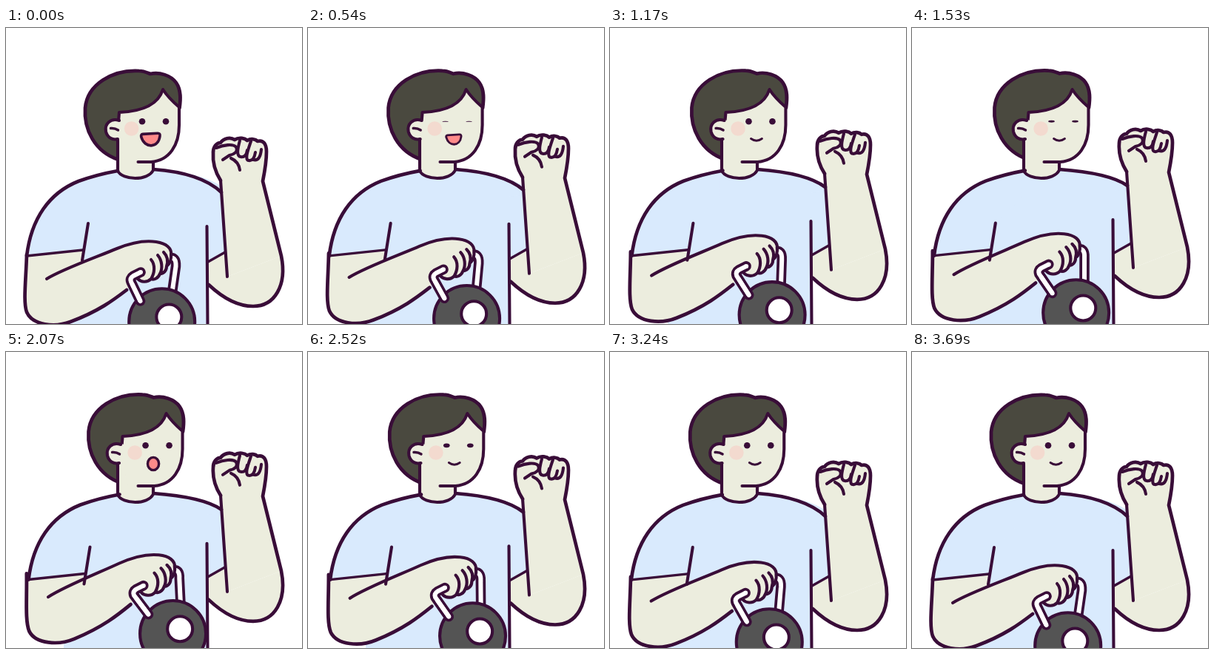
Write an HTML page that moves like this. It is 400x400 px and loops after 4.05 s.

```html
<!DOCTYPE html>
<html lang="en">
<head>
<meta charset="utf-8">
<title>Kettlebell workout</title>
<style>
  html, body { margin: 0; width: 100%; height: 100%; overflow: hidden; background: #fff; }
  svg { display: block; width: 100vw; height: 100vh; }
  .line { fill: none; }
  .edge { fill: none; stroke-width: 4.7; }
  .skin { fill: #ecedde; }
  .shirt { fill: #d9eafd; }
  .hair { fill: #4a493f; stroke-width: 4.7; }
  .flat { stroke: none; }
  .thin { stroke-width: 3.4; }
  .rim { fill: none; stroke-width: 13.5; }
  .core { fill: none; stroke: #fff; stroke-width: 6; }
</style>
</head>
<body>
<svg viewBox="0 0 400 400" stroke="#390d38" stroke-width="4.1" stroke-linecap="round" stroke-linejoin="round">
  <!-- torso -->
  <path class="shirt flat" d="M90 300C90 250 100 225 130 205L151 193L199 191C240 193 272 201 291 214L293 250L272 262V400H78V380Z"/>

  <!-- raised arm -->
  <g id="raised">
    <path class="skin flat" d="M273 316L297 303L299 336L372 308C380 348 363 376 334 376C312 376 291 363 274 347"/>
    <path class="shirt flat" d="M272 232L291 230L297 303L272 316Z"/>
    <path class="line thin" d="M273 316L296 303"/>
    <path class="skin flat" d="M299 336L290 206C283 195 279 181 280 168C280 160 285 155 290 155C294 149 303 147 309 151C315 147 323 149 326 152C331 149 337 150 340 153C348 151 352 157 352 167C352 180 350 192 347 207L372 308Z"/>
    <path class="edge" d="M290 206C283 195 279 181 280 168C280 160 285 155 290 155C294 149 303 147 309 151C315 147 323 149 326 152C331 149 337 150 340 153C348 151 352 157 352 167C352 180 350 192 347 207L372 308C380 348 363 376 334 376C312 376 291 363 274 347"/>
    <path class="line" d="M290 206L299 336M284 162C294 158 307 156 311 161C314 167 308 171 302 172L293 178M304 176C311 179 315 185 316 192"/>
    <path class="line" d="M316 152C313 163 311 173 317 174C322 175 325 172 326 165M331 153C327 165 322 178 328 179C334 180 336 174 337 168M345 164C344 174 341 180 334 178"/>
  </g>
  <path id="shoulder" class="edge"/>
  <path id="side" class="line"/>

  <!-- neck and head -->
  <path id="backHair" class="hair" d="M152 178C119 167 105 136 107 108C110 76 144 56 180 58C186 58 190 60 195 62C207 59 223 64 230 74C237 84 236 97 234.5 108L200 140Z"/>
  <path class="skin flat" d="M151 140V193C157 206 192 207 199 192V160Z"/>
  <path class="line" d="M151 148V193C157 206 192 207 199 192V181"/>
  <g id="face">
    <path class="skin flat" d="M153 114C178 113 205 106 212 83C219 94 227 101 234 107V131C234 158 221 179 196 181H160L153 150Z"/>
    <path class="line" d="M152 126L153 114C178 113 205 106 212 83C219 94 227 101 234 107V131C234 158 221 179 196 181H184"/>
    <circle class="flat" cx="169.6" cy="136" r="9.8" fill="#f3dacf"/>
    <g fill="#390d38" stroke="none">
      <ellipse class="eye" cx="184" cy="126.3" rx="4.3"/>
      <ellipse class="eye" cx="216" cy="126.3" rx="4.3"/>
    </g>
    <path id="smile" class="line" stroke-width="2.8" d="M187 149.5Q194.5 155 202 149.5"/>
    <path id="laugh" fill="#ff8a8a" stroke-width="3.6" d="M185 143.4L205 142.2Q208.5 142 208 146C206 163 187 163 182.7 147Q182 143.7 185 143.4Z"/>
    <ellipse id="gasp" fill="#ff8a8a" stroke-width="3.4" cx="194.5" cy="151" rx="7.6" ry="8.6"/>
  </g>
  <path class="line" d="M178.5 181H196"/>
  <g id="ear">
    <path class="skin flat" d="M158 125C141 121 133 130 135 140C137 148 144 152 158 150Z"/>
    <path class="line" d="M153 125C141 121 133 130 135 140C137 148 144 152 151 150"/>
    <path class="line thin" d="M141.5 135.5Q147 135 151.5 138"/>
  </g>

  <!-- kettlebell behind the hand -->
  <path class="rightTube rim"/>
  <path class="rightTube core"/>
  <g id="bell">
    <circle cx="210.7" cy="396.8" r="44.5" fill="#545454"/>
    <circle cx="220.3" cy="390.5" r="17" fill="#fff"/>
  </g>

  <!-- lifting arm -->
  <g id="lift">
    <path class="skin flat" d="M28 304L104 297L102 317L150 298C172 289 190 287 203 289C217 291 224 298 223 306C224 314 221 319 217 322C217 328 213 332 208 332C206 338 200 341 196 339C190 345 182 343 176 338L163 354C146 367 125 383 87 397C66 405 36 402 28 384C23 370 27 340 28 304Z"/>
    <path class="line" d="M55 339C76 326 124 309 150 298C172 289 190 287 203 289C217 291 224 298 223 306"/>
    <path class="edge" d="M163 354C146 367 125 383 87 397C66 405 36 402 28 384C23 370 27 340 28 306"/>
  </g>
  <g id="fingers">
    <path class="skin flat" d="M180 329L196 312L214 300L223 304C224 314 221 319 217 322C217 328 213 332 208 332C206 338 200 341 196 339C190 345 181 342 178 335Z"/>
    <path class="line" d="M223 304C224 314 221 319 217 322C217 328 213 332 208 332C206 338 200 341 196 339C190 345 182 343 178 339M213 303C219 309 219 316 217 322M205 307C211 314 212 325 208 332M196 313C202 320 201 331 196 339"/>
  </g>
  <path class="leftTube rim"/>
  <path class="leftTube core" stroke-linecap="butt"/>
  <path class="leftTube core" pathLength="100" stroke-dasharray="0 50 50"/>

  <!-- left sleeve -->
  <g id="sleeve">
    <path class="shirt flat" d="M28 308C34 258 58 223 98 207Q123 198 147 194V230L111 264L104 300Z"/>
    <path class="edge" d="M151 193Q123 198 98 207C58 223 34 258 28 308"/>
    <path class="line thin" d="M28 308L104 300"/>
    <path class="line" d="M111 264L103 314"/>
  </g>
</svg>
<script>
const STEP = 90, LAST = 41, LOOP = 4050;
const $ = id => document.getElementById(id);
const all = cls => document.querySelectorAll('.' + cls);
const set = (el, name, value) => el.setAttribute(name, value);
const move = (id, x, y) => set($(id), 'transform', `translate(${x} ${y})`);
const show = (id, on) => set($(id), 'visibility', on ? 'visible' : 'hidden');
const setAll = (cls, name, value) => all(cls).forEach(el => set(el, name, value));

// Linear rise to 1 at peak, linear fall to 0 at end.
const tent = (t, peak, end) => Math.max(0, Math.min(t / peak, (end - t) / (end - peak)));

const blinks = [540, 1620, 2700];
const eyeOpen = t => Math.min(1, ...blinks.map(b => Math.abs(t - b) / 270));

function drawHead(t) {
  const turn = 5.3 * tent(t, 1800, 3690);
  move('backHair', turn, -turn * 0.1);
  move('face', turn, 0);
  move('ear', turn * 0.45, 0);
  setAll('eye', 'ry', Math.max(0.5, 4.3 * eyeOpen(t)));

  const laughing = t < 720, gasping = t >= 1800 && t < 2520;
  show('laugh', laughing);
  show('gasp', gasping);
  show('smile', !laughing && !gasping);
  const size = 1 - 0.2 * t / 540;
  set($('laugh'), 'transform', `translate(195 150.5) scale(${size}) translate(-195 -150.5)`);
}

function drawRaisedArm(t) {
  const up = 14.5 * tent(t, 1845, 3240);
  move('raised', 0, -up);
  set($('shoulder'), 'd', `M199 191C240 194 272 ${204 - up * 0.35} 291 ${222 - up * 0.75}`);
  set($('side'), 'd', `M271.5 ${268 - up * 0.75}L272.5 402`);
}

function drawLift(t) {
  const p = tent(t, 2160, 3690);
  const arm = `translate(${p} ${-7 * p}) rotate(${-2.7 * p} 30 330) translate(30 0) scale(${1 + 0.028 * p} 1) translate(-30 0)`;
  set($('lift'), 'transform', arm);
  set($('fingers'), 'transform', arm);
  move('bell', 15.5 * p, -17 * p);
  move('sleeve', 2.6 * p, -0.5 * p);

  const at = (x, y, dx, dy) => `${x + dx * p} ${y + dy * p}`;
  const left = (x, y) => at(x, y, 4, -15);
  const right = (x, y) => at(x, y, 5, -16.5);
  setAll('leftTube', 'd', `M${left(182, 330)}L${left(172, 335)}Q${left(167, 338)} ${left(169, 343)}L${at(181.5, 369, 11.5, -15)}`);
  setAll('rightTube', 'd', `M${right(220, 311)}C${right(227, 309)} ${right(230, 313)} ${right(229.5, 322)}L${at(224.5, 357, 12, -17)}`);
}

function draw(now) {
  const t = Math.min(LAST, Math.floor(now % LOOP / STEP)) * STEP;
  drawHead(t);
  drawRaisedArm(t);
  drawLift(t);
}

let start;
function tick(now) {
  start ??= now;
  draw(now - start);
  requestAnimationFrame(tick);
}
draw(0);
requestAnimationFrame(tick);
</script>
</body>
</html>
```
